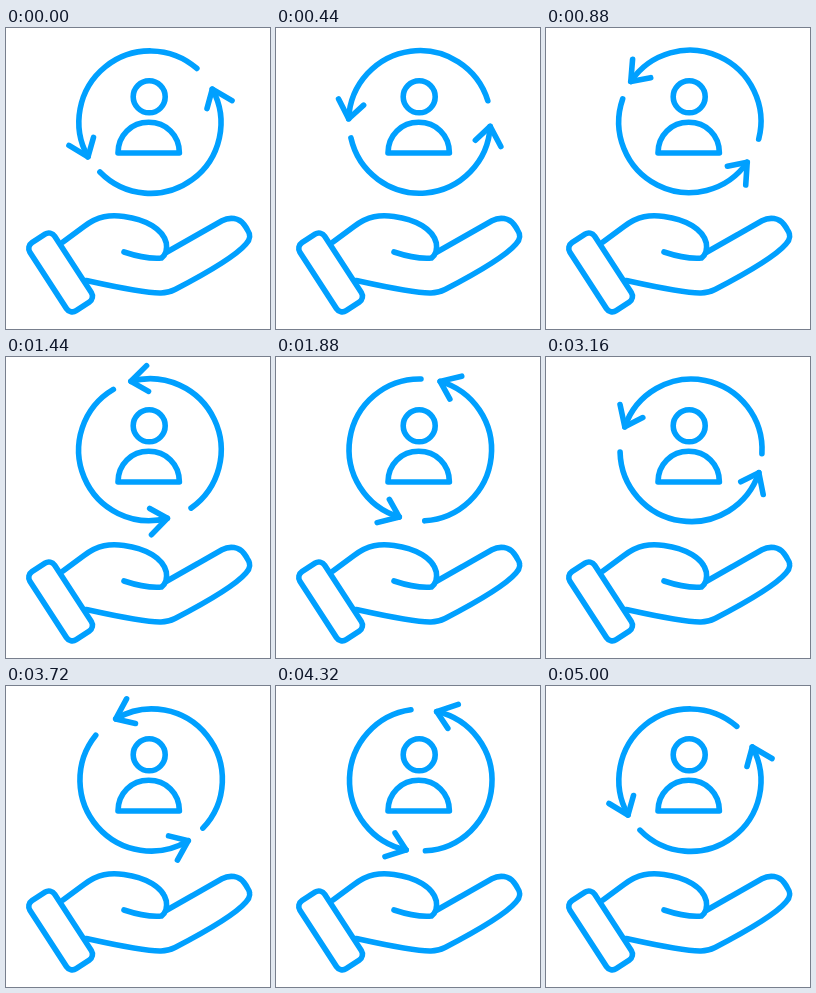
Recreate the animation shown at these times as an HTML page. Size 264 px wide and 301 px high, loop 5040 ms.

```html
<!DOCTYPE html>
<html lang="en">
<head>
<meta charset="utf-8">
<title>Hand and cycle</title>
<style>
  html, body { margin: 0; width: 100%; height: 100%; overflow: hidden; background: #fff; }
  svg { display: block; width: 100vw; height: 100vh; }
</style>
</head>
<body>
<svg viewBox="0 0 264 301" fill="none" stroke="#00a0ff" stroke-width="5.6" stroke-linecap="round" stroke-linejoin="round">
  <g id="cycle">
    <path d="M190.8 40.4 A71.2 71.2 0 0 0 82 129"/>
    <path d="M63 117.5 L82 129 L87.5 109.5"/>
    <path d="M94 144.1 A70.5 70.5 0 0 0 206.3 61"/>
    <path d="M226 72.5 L206.3 61 L201 80.5"/>
  </g>
  <g id="person">
    <circle cx="143.2" cy="68.8" r="16"/>
    <path d="M112 125 C112 107 125.5 94.3 142.7 94.3 C160 94.3 173.4 107 173.4 125 Z"/>
  </g>
  <g id="hand">
    <rect x="-40.6" y="-14.8" width="81.2" height="29.6" rx="7" transform="translate(54.6 244.4) rotate(57)"/>
    <path d="M57 214 L78 198.5 C92 188 104 186.5 118 188.5 C140 191.5 157 201 160.3 215 C161.3 221 160 226.5 155.5 230 C143 231 130 228 118 224"/>
    <path d="M161 224 L216 192.8 C224 188.5 233 190 238 196.5 C239.5 198.5 240.5 200 241.5 202 C245 207 244.5 211 240 216 C228 230 195 248 169 261.5 C164 264 160 265 155 265 C138 265.5 105 258 80 252.5"/>
  </g>
</svg>
<script>
  const LOOP = 5040, TURN = 5000;
  const cycle = document.getElementById('cycle');

  // One steady clockwise turn, then a short rest before the loop restarts.
  function draw(now) {
    const t = Math.min(now % LOOP, TURN);
    cycle.setAttribute('transform', `rotate(${360 * t / TURN} 144.5 93.5)`);
  }

  function tick() {
    draw(performance.now());
    requestAnimationFrame(tick);
  }
  tick();
</script>
</body>
</html>
```
